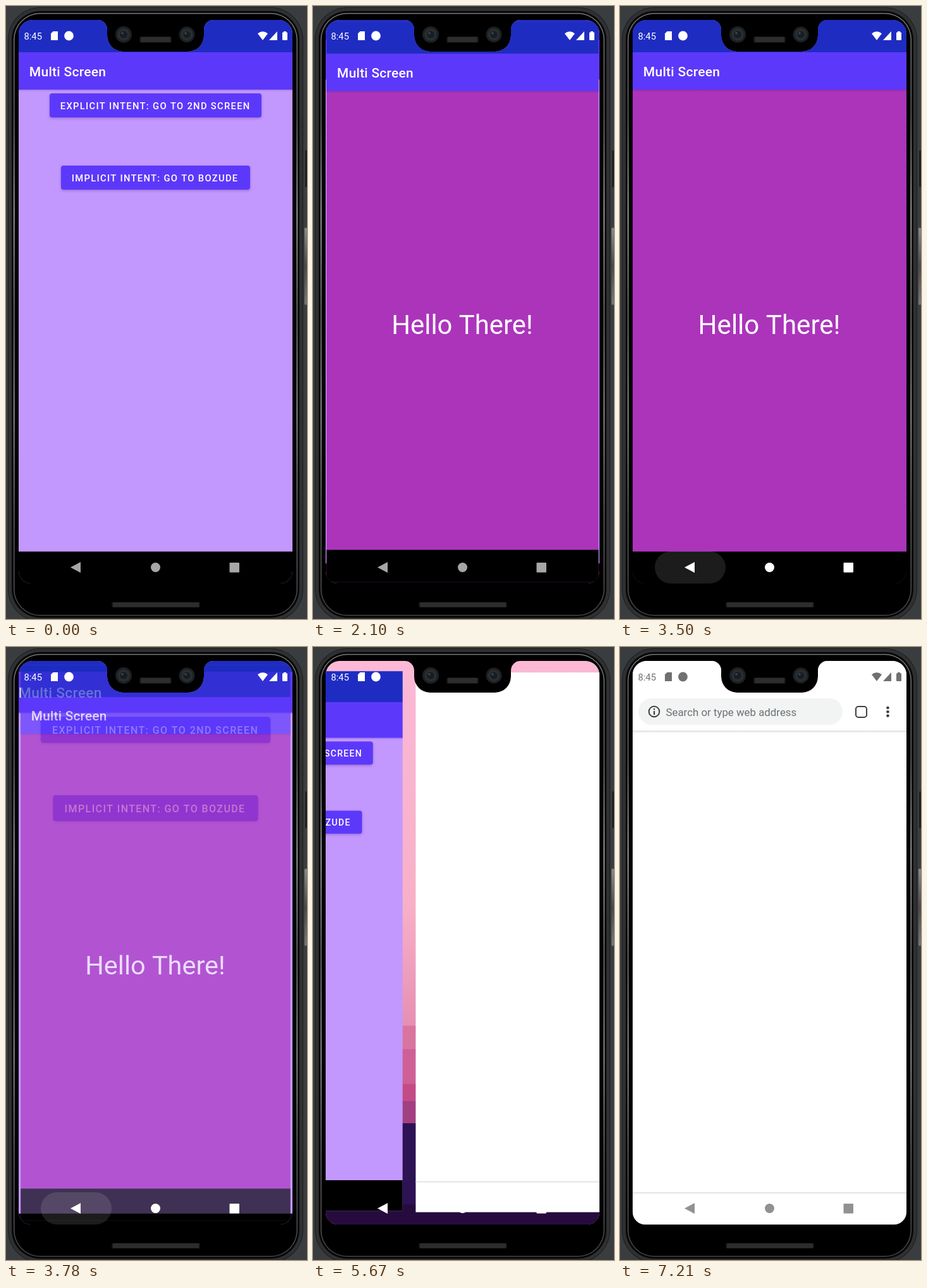
Write an HTML page with a canvas that moves like this. It is 476x968 px and loops after 8000 ms.

```html
<!DOCTYPE html>
<html lang="en">
<head>
<meta charset="utf-8">
<title>Multi Screen</title>
<style>
html, body { margin: 0; width: 100%; height: 100%; overflow: hidden; background: #3a3d3f; }
canvas { display: block; width: 100vw; height: 100vh; }
</style>
</head>
<body>
<canvas id="stage" width="476" height="968"></canvas>
<script>
const W = 476, H = 968, LOOP = 8000, STEP = 70;
const L = 20, R = 453, T = 22, B = 912, MID = 236.5, NAV = 861.4;
const PURPLE = '#5c39fa';
const stage = document.getElementById('stage').getContext('2d');
const layerCanvas = document.createElement('canvas');
layerCanvas.width = W;
layerCanvas.height = H;
const layer = layerCanvas.getContext('2d');

// ---- timing ----
const ramp = (t, from, to) => Math.min(1, Math.max(0, (t - from) / (to - from)));
const mix = (a, b, k) => a + (b - a) * k;
const cubic = (p, u) => {
  const v = 1 - u;
  return p[0] * v * v * v + 3 * p[1] * v * v * u + 3 * p[2] * v * u * u + p[3] * u * u * u;
};
function solve(xs, ys, x) {
  let lo = 0, hi = 1;
  for (let i = 0; i < 24; i++) {
    const u = (lo + hi) / 2;
    if (cubic(xs, u) < x) lo = u; else hi = u;
  }
  return cubic(ys, lo);
}
const standard = x => solve([0, .4, .2, 1], [0, 0, 1, 1], x);
const emphasized = x => x < 1 / 6
  ? solve([0, .05, .13333, .16667], [0, 0, .06, .4], x)
  : solve([.16667, .20833, .25, 1], [.4, .82, 1, 1], x);

// ---- drawing helpers ----
function box(c, x, y, w, h, fill, r = 0) {
  c.fillStyle = fill;
  c.beginPath();
  c.roundRect(x, y, w, h, r);
  c.fill();
}
function disc(c, x, y, r, fill) {
  c.fillStyle = fill;
  c.beginPath();
  c.arc(x, y, r, 0, 7);
  c.fill();
}
function poly(c, points, fill) {
  c.fillStyle = fill;
  c.beginPath();
  points.forEach(p => c.lineTo(...p));
  c.fill();
}
function text(c, str, x, y, size, fill, weight = 400, spacing = 0, align = 'left') {
  c.font = `${weight} ${size}px Roboto, sans-serif`;
  c.letterSpacing = spacing + 'px';
  c.textAlign = align;
  c.fillStyle = fill;
  c.fillText(str, x, y);
}
function fade(c, x0, y0, x1, y1, ...colors) {
  const g = c.createLinearGradient(x0, y0, x1, y1);
  colors.forEach((col, i) => g.addColorStop(i / (colors.length - 1), col));
  return g;
}
function placed(c, scale, pivotY, dx, draw) {
  c.save();
  c.translate(MID + dx, pivotY);
  c.scale(scale, scale);
  c.translate(-MID, -pivotY);
  draw(c);
  c.restore();
}

// ---- phone body ----
function grille(c, x, y, w, h) {
  box(c, x, y, w, h, '#141414', 3);
  for (let j = 1; j < h - 1; j++)
    for (let i = 2 + j % 2; i < w - 2; i += 2) box(c, x + i, y + j, 1, 1, '#464646');
}
function camera(c, x, y, r) {
  disc(c, x, y, r, '#1c2023');
  disc(c, x, y, r * .75, '#282e32');
  disc(c, x, y, r * .45, '#181d21');
  disc(c, x - 2, y - 2, 1.8, '#3e484f');
}
function phone(c) {
  box(c, 0, 0, W, H, '#3a3d3f');
  box(c, 473, 228, 3, 58, '#1d1e1f', 1);
  box(c, 472, 350, 4, 122, fade(c, 0, 350, 0, 472, '#8a8a8a', '#4a4a4a', '#777'), 2);
  const rim = fade(c, 0, 10, 0, 964, '#777', '#666', '#bbb', '#777', '#aaa', '#666', '#444');
  const rings = [[3, '#1b1c1d'], [4, '#2e3032'], [9, '#080808'], [12, rim], [13.5, '#000']];
  for (const [d, fill] of rings) box(c, d, d - 1, 473 - 2 * d, 976 - 2 * d, fill, 54 - d);
  camera(c, 186, 45, 13);
  camera(c, 286, 45, 12.5);
  grille(c, 211, 48, 51, 10);
  grille(c, 167, 941, 140, 9);
}
function clipScreen(c) {
  const corners = [
    [L, T, 22], [160, T, 15], [160, 72, 25], [313, 72, 25],
    [313, T, 15], [R, T, 22], [R, B, 20], [L, B, 20]
  ];
  c.beginPath();
  c.moveTo(L, H / 2);
  corners.forEach(([x, y, r], i) => {
    const [nx, ny] = corners[(i + 1) % corners.length];
    c.arcTo(x, y, nx, ny, r);
  });
  c.closePath();
  c.clip();
}

// ---- app windows ----
function appWindow(c, back) {
  box(c, L, T, R - L, B - T, back);
  box(c, L, 132, R - L, 3, fade(c, 0, 132, 0, 135, 'rgba(40,0,90,.2)', 'rgba(40,0,90,0)'));
  box(c, L, T, R - L, 51, '#1f2cc2');
  box(c, L, 73, R - L, 59, PURPLE);
  text(c, 'Multi Screen', 36.8, 110.5, 21.05, '#fff', 500, .26);
  box(c, L, NAV, R - L, B - NAV, '#000');
}
function button(c, x, y, w, label, ripple) {
  c.save();
  c.shadowColor = 'rgba(40,0,90,.28)';
  c.shadowBlur = ripple.alpha > 0 ? 7 : 4;
  c.shadowOffsetY = 1.5;
  box(c, x, y, w, 38, PURPLE, 4);
  c.restore();
  if (ripple.alpha > 0) {
    c.save();
    c.beginPath();
    c.roundRect(x, y, w, 38, 4);
    c.clip();
    disc(c, ripple.x, y + 19, ripple.r, `rgba(190,140,250,${.42 * ripple.alpha})`);
    c.restore();
  }
  text(c, label, x + 16.8, y + 25, 14.74, '#fff', 500, 1.316);
}
function menuScreen(c, t) {
  appWindow(c, '#c298ff');
  button(c, 69, 138, 335, 'EXPLICIT INTENT: GO TO 2ND SCREEN', {
    x: 246, r: mix(138, 190, ramp(t, 1540, 1610)),
    alpha: t < 1540 ? 0 : 1 - ramp(t, 1680, 1960)
  });
  button(c, 87, 252, 299, 'IMPLICIT INTENT: GO TO BOZUDE', {
    x: 240, r: mix(70, 165, ramp(t, 4760, 4900)),
    alpha: t < 4760 ? 0 : 1 - ramp(t, 4900, 5180)
  });
}
function helloScreen(c) {
  appWindow(c, '#ab34bb');
  text(c, 'Hello There!', MID - .5, 518, 42.1, '#fff', 400, 0, 'center');
}
function browser(c, t) {
  box(c, L, T, R - L, B - T, '#fff');
  box(c, L, 861, R - L, 2, '#e4e4e4');
  if (t < 6160) return;
  box(c, 29, 81, 323, 42, '#f2f4f4', 21);
  c.lineWidth = 2;
  c.strokeStyle = '#3c4043';
  c.beginPath();
  c.arc(54, 102, 8.3, 0, 7);
  c.stroke();
  box(c, 53, 97, 2.2, 2.2, '#3c4043');
  box(c, 53, 101, 2.2, 6, '#3c4043');
  text(c, 'Search or type web address', 72.5, 109, 16.85, '#6c7074');
  c.beginPath();
  c.roundRect(373, 94, 17, 17, 4);
  c.stroke();
  for (const y of [96, 102.3, 108.6]) disc(c, 423.5, y, 2.3, '#3c4043');
  box(c, L, 132, R - L, 4, fade(c, 0, 132, 0, 136, '#dcdcdc', '#fff'));
}
function wallpaper(c) {
  box(c, L, T, R - L, B - T, fade(c, 0, T, 0, 600, '#fbb9d6', '#f9b4cf', '#f8b0c8', '#e58fb2'));
  const hills = [[598, '#d9749f'], [635, '#cf6097'], [690, '#c34c87'], [717, '#a24181'], [752, '#2d1254'], [880, '#260c3e']];
  for (const [y, fill] of hills) box(c, L, y, R - L, B - y, fill);
}

// ---- system bars ----
function statusIcons(c, fill) {
  text(c, '8:45', 28.5, 52.5, 14.75, fill);
  poly(c, [[74.5, 40], [82, 40], [82, 54], [71, 54], [71, 43.5]], fill);
  disc(c, 99.5, 47, 7.4, fill);
  c.beginPath();
  c.moveTo(406, 54);
  c.lineTo(398, 43.5);
  c.quadraticCurveTo(406, 37, 414, 43.5);
  c.fill();
  poly(c, [[429, 40], [429, 54], [416, 54]], fill);
  box(c, 437, 41.5, 8, 12.5, fill, 1);
  box(c, 439, 40, 4, 2, fill);
}
function navIcons(c, fill) {
  poly(c, [[102, 886.5], [118, 878], [118, 895]], fill);
  disc(c, MID, 886.5, 7.5, fill);
  box(c, 353.5, 879, 15.5, 15.5, fill, 1);
}
function backRipple(c, t) {
  if (t < 3290 || t > 4130) return;
  const half = mix(44, 56, ramp(t, 3290, 3430));
  box(c, 111 - half, 861, 2 * half, 51, `rgba(255,255,255,${.11 * (1 - ramp(t, 3850, 4130))})`, 25.5);
}
const grey = v => `rgb(${v},${v},${v})`;

// ---- scene ----
function showHello(c, scale, alpha) {
  if (alpha <= 0) return;
  layer.clearRect(0, 0, W, H);
  placed(layer, scale, 466, 0, helloScreen);
  c.globalAlpha = alpha;
  c.drawImage(layerCanvas, 0, 0);
  c.globalAlpha = 1;
}
function windows(c, t) {
  const menu = s => placed(c, s, 466, 0, () => menuScreen(c, t));
  if (t >= 5670) {
    const e = t - 5562;
    const p = emphasized(ramp(e, 0, 500));
    const scale = e < 238
      ? mix(1, .95, standard(ramp(e, 0, 190)))
      : mix(.95, 1, standard(ramp(e, 238, 620)));
    const span = 1.05 * (R - L) * scale;
    wallpaper(c);
    placed(c, scale, 403, -span * p, () => menuScreen(c, t));
    placed(c, scale, 451, span * (1 - p), () => browser(c, t));
  } else if (t >= 3731) {
    const e = t - 3731;
    const p = emphasized(ramp(e, 0, 400));
    menu(mix(1.1, 1, p));
    showHello(c, mix(1, .9, p), 1 - ramp(e, 22, 105));
  } else if (t >= 1890) {
    const e = t - 1890;
    const p = emphasized(ramp(e, 0, 400));
    menu(mix(1, 1.05, p));
    showHello(c, mix(.85, 1, p), ramp(e, 35, 85));
  } else {
    menu(1);
  }
}
function scene(t) {
  const c = stage;
  phone(c);
  c.save();
  clipScreen(c);
  windows(c, t);
  const dark = ramp(t, 6720, 7000);
  backRipple(c, t);
  statusIcons(c, grey(mix(255, 112, dark)));
  navIcons(c, grey(t < 3290 ? 166 : mix(255, 145, dark)));
  c.restore();
}

const start = performance.now();
function tick(now) {
  const t = Math.max(0, now - start) % LOOP;
  scene(Math.floor(t / STEP) * STEP);
  requestAnimationFrame(tick);
}
requestAnimationFrame(tick);
</script>
</body>
</html>
```
